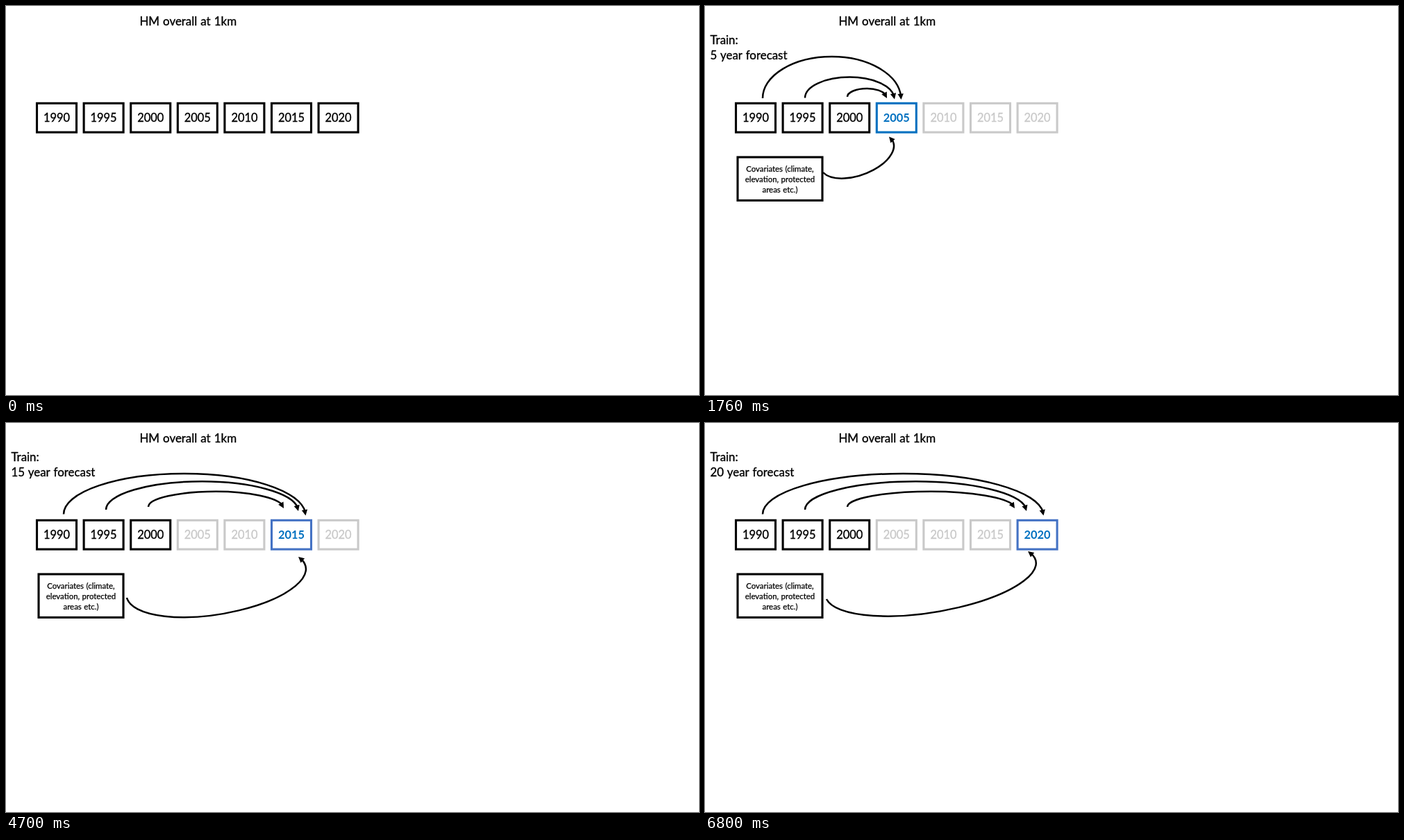
Recreate the animation shown at these times as an HTML page. Size 998 px wide and 561 px high, loop 8 s.

```html
<!DOCTYPE html>
<html lang="en">
<head>
<meta charset="utf-8">
<title>Forecast training steps</title>
<style>
  html, body { margin: 0; width: 100%; height: 100%; overflow: hidden; background: #fff; }
  svg { display: block; width: 998px; height: 561px; }
  text {
    font-family: Lato, Inter, sans-serif; font-size: 16.9px; word-spacing: .8px;
    fill: currentColor; stroke: currentColor; stroke-width: .35px;
  }
  .year { font-size: 16.4px; text-anchor: middle; }
  .chosen { font-weight: 700; stroke: none; }
  .note { font-size: 11.4px; word-spacing: .6px; text-anchor: middle; stroke-width: .25px; }
  rect { fill: #fff; stroke: currentColor; stroke-width: 3.1; }
  .line { fill: none; stroke: #000; stroke-width: 2.5; }
  .scene { visibility: hidden; animation: 8s step-end infinite; }
  .s0 { animation-name: s0; }
  .s1 { animation-name: s1; }
  .s2 { animation-name: s2; }
  .s3 { animation-name: s3; }
  .s4 { animation-name: s4; }
  @keyframes s0 { 0% { visibility: visible } 6.25%, 100% { visibility: hidden } }
  @keyframes s1 { 0% { visibility: hidden } 6.25% { visibility: visible } 32.5%, 100% { visibility: hidden } }
  @keyframes s2 { 0% { visibility: hidden } 32.5% { visibility: visible } 58.75%, 100% { visibility: hidden } }
  @keyframes s3 { 0% { visibility: hidden } 58.75% { visibility: visible } 85%, 100% { visibility: hidden } }
  @keyframes s4 { 0% { visibility: hidden } 85%, 100% { visibility: visible } }
</style>
</head>
<body>
<svg id="stage" viewBox="0 0 998 561">
  <text x="192.4" y="28">HM overall at 1km</text>
</svg>
<script>
const BLACK = '#000', GREY = '#c9c9c9', BLUE = '#0070c0', INDIGO = '#4472c4';

// Heights of the three arcs: their tops and their tips.
const near = { tops: [73, 102.5, 119], ends: [135, 134.5, 133], edge: BLUE };
const far = { tops: [73, 84.3, 98.8], ends: [133.5, 127, 123], edge: INDIGO };

// tips: where each arc lands; feed: start and tip of the lower arrow
const steps = [
  { ...near, tips: [282.5, 273, 262], feed: [170, 240, 265, 188.5] },
  { ...near, tips: [345.5, 337, 333], feed: [174, 249, 348, 197] },
  { ...far, tips: [431.5, 421, 400], feed: [174, 252, 421, 193] },
  { ...far, tips: [487.5, 463, 446], feed: [175, 254, 465, 185] }
];

const rect = (x, y, w, h, color) =>
  `<rect x="${x}" y="${y}" width="${w}" height="${h}" color="${color}"/>`;

const label = (cls, x, y, str, color = BLACK) =>
  `<text class="${cls}" x="${x}" y="${y}" color="${color}">${str}</text>`;

function yearBox(i, edge, ink = edge, cls = 'year') {
  const x = 44.5 + 67.6 * i;
  return rect(x, 140.3, 57, 41.8, edge) + label(cls, x + 28.5, 167, 1990 + 5 * i, ink);
}

// The head follows the chord of the last stretch; the line stops inside it.
function arrow(d) {
  const path = document.createElementNS('http://www.w3.org/2000/svg', 'path');
  path.setAttribute('d', d);
  const len = path.getTotalLength();
  const tip = path.getPointAtLength(len), back = path.getPointAtLength(len - 8);
  const turn = Math.atan2(tip.y - back.y, tip.x - back.x) * 180 / Math.PI;
  return `<path class="line" d="${d}" stroke-dasharray="${len - 5} ${len}"/>
    <path d="M0 0L-8.4 4.2V-4.2Z" transform="translate(${tip.x} ${tip.y}) rotate(${turn})"/>`;
}

// Half an ellipse, its start a little higher than its tip.
function arc(x0, x1, top, end) {
  const r = (x1 - x0) / 2, y0 = end - 2;
  return arrow(`M${x0} ${y0}A${r} ${y0 - top} 0 0 1 ${x0 + r} ${top}
    A${r} ${end - top} 0 0 1 ${x1} ${end}`);
}

// Just over half of an ellipse, tilted towards the tip.
function feedArrow([x0, y0, x1, y1]) {
  const half = Math.hypot(x1 - x0, y1 - y0) / 2;
  const tilt = .7 * Math.atan2(y1 - y0, x1 - x0) * 180 / Math.PI;
  const depth = Math.min(38 + .07 * half, .54 * half);
  return arrow(`M${x0} ${y0}A${1.03 * half} ${depth} ${tilt} 1 0 ${x1} ${y1}`);
}

function covariates() {
  const lines = ['Covariates (climate,', 'elevation, protected', 'areas etc.)'];
  return rect(47, 218, 122, 62.4, BLACK) +
    lines.map((s, i) => label('note', 108, 238.7 + 15 * i, s)).join('');
}

function scene({ tips, tops, ends, edge, feed }, n) {
  let out = label('', 7.5, 55, 'Train:') + label('', 7.5, 77, `${5 * n} year forecast`);
  for (let i = 0; i < 7; i++) {
    if (i < 3) out += yearBox(i, BLACK);
    else if (i === n + 2) out += yearBox(i, edge, BLUE, 'year chosen');
    else out += yearBox(i, GREY);
  }
  if (n === 2) out += '<path d="M246 183H306" stroke="#000" stroke-width="1.3"/>';
  const arcs = tips.map((x, i) => arc(83 + 61 * i, x, tops[i], ends[i]));
  return out + covariates() + arcs.join('') + feedArrow(feed);
}

const intro = Array.from({ length: 7 }, (_, i) => yearBox(i, BLACK)).join('');
const scenes = [intro, ...steps.map((s, i) => scene(s, i + 1))];
document.getElementById('stage').insertAdjacentHTML('beforeend',
  scenes.map((s, i) => `<g class="scene s${i}">${s}</g>`).join(''));
</script>
</body>
</html>
```
